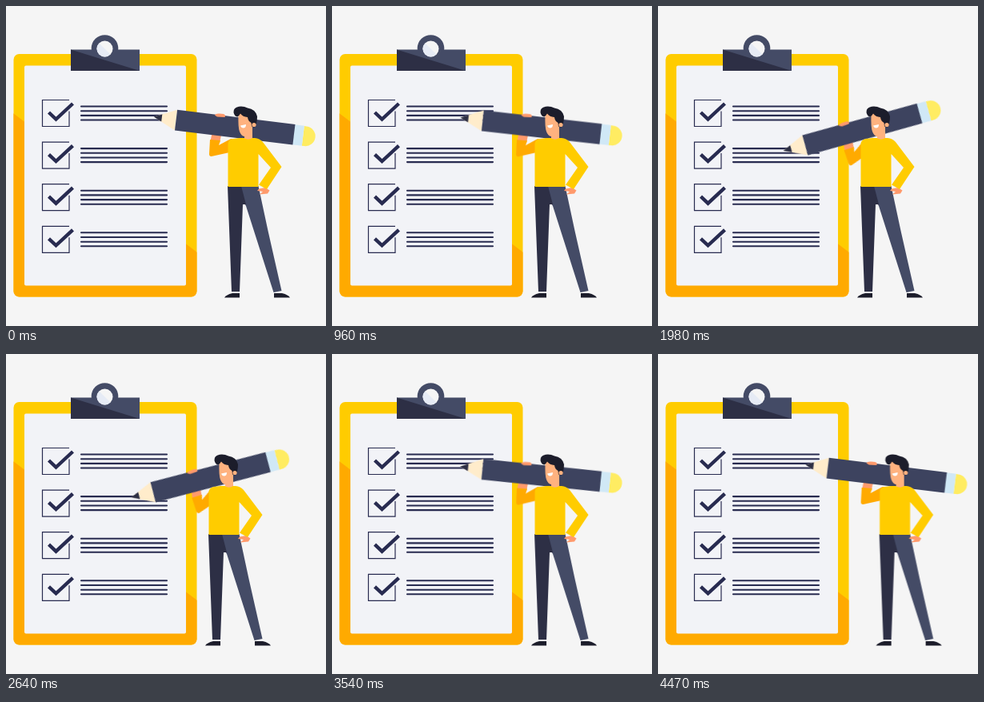
Animation, 400 px wide and 400 px high, one loop 4500 ms. Source, as an HTML page:

```html
<!DOCTYPE html>
<html lang="en">
<head>
<meta charset="utf-8">
<title>Checklist</title>
<style>
  html, body { margin: 0; width: 100%; height: 100%; overflow: hidden; background: #f5f5f5; }
  svg { display: block; width: 100%; height: 100%; }
  #arm { transform-origin: 289px 170px; }
  .navy { fill: #2d2f45; }
  .slate { fill: #444b66; }
  .skin { fill: #ff9a6c; }
  .face { fill: #ffb27f; }
  .shirt { fill: #ffcc00; }
  .shade { fill: #ffaa00; }
  .ink { fill: #1c1d2b; }
</style>
</head>
<body>
<svg viewBox="0 0 400 400">
  <defs>
    <clipPath id="board"><rect x="9.5" y="60" width="229" height="303.5" rx="7"/></clipPath>
    <g id="item" fill="none" stroke="#282b50">
      <path d="M79 131.500V150.500H45.500V117.500H79" stroke-width="1.200"/>
      <path d="M53.500 133L62.500 141.500L83.500 122" stroke-width="4.400"/>
      <path d="M94 125.500H201M94 131.200H201M94 136.900H201M94 142.500H201" stroke-width="2.100" stroke-linecap="round"/>
    </g>
  </defs>

  <g clip-path="url(#board)">
    <rect class="shirt" x="9" y="60" width="230" height="304"/>
    <path class="shade" d="M9 134L239 308V364H9Z"/>
  </g>
  <rect x="23" y="74.5" width="202" height="275" rx="2" fill="#f2f3f7"/>
  <circle class="slate" cx="123.5" cy="53" r="16.8"/>
  <rect class="slate" x="81" y="54.5" width="86" height="26.5"/>
  <path class="navy" d="M81 54.5L167 81H81Z"/>
  <circle cx="123.5" cy="53.5" r="10" fill="#f5f5f5"/>
  <path d="M116.4 46.4A10 10 0 0 0 130.6 60.6Z" fill="#e6ebf5"/>
  <g id="list"></g>

  <g id="man">
    <g id="arm">
      <path class="skin" d="M262 138H274L267 171H255Z"/>
      <path class="shade" d="M255 167L254 185Q254 189 259 187.500L284 182L292 168L281 166L266 174L268 168Z"/>
      <g transform="translate(212.500 143) rotate(7)">
        <path d="M-28 -1L0 -13.300V12.500Z" fill="#ffeccb"/>
        <path class="navy" d="M-28 -1L-18 -5.400V3.800Z"/>
        <path d="M160 -12.500H163A12.400 12.400 0 0 1 163 12.300H160Z" fill="#ffec62"/>
        <rect x="148" y="-12.800" width="12" height="25.200" fill="#d0e8f6"/>
        <rect y="-13.300" width="148.500" height="25.800" fill="#3d435f"/>
      </g>
      <path class="skin" d="M261 136.500Q262 134 267 134.500L272 135Q275 136 273.500 139L264 138.500Z"/>
    </g>

    <path class="ink" d="M273 364.500Q275 361 283 359H292V364.500ZM335 364.500V359H345Q353 361 355 364.500Z"/>
    <path class="slate" d="M294 225H315.500L327.500 281L344.500 356L334.500 358L300 250L294 240Z"/>
    <path class="navy" d="M277 225H294L300 248H296L292 357H282Z"/>
    <path class="skin" d="M316 228.500L324 227L329.500 230.500L327 234.500L317 235.500L321 232L314 231Z"/>
    <path class="shirt" d="M277.500 226V172Q278 167 284 166L292 165H311Q317 165.500 321 170L344.500 201L326 229L316 223.500L331 202L315.500 185V226Z"/>

    <path class="face" d="M290.500 136Q290 152 292 157Q294 162.500 298 163V165.500Q303 168 308 165V150L306 133H292Z"/>
    <path class="ink" d="M284.500 133Q284 127 291 125.800Q297 125 302 127.500Q312 129 314 138Q314 147 310.500 151.500L307 150.500L306.500 146Q302.500 144 302 139Q296 138.500 293 134.500Q291.500 137 289.500 138.500Q285.500 138 284.500 133Z"/>
    <circle class="face" cx="310" cy="148.500" r="2.600"/>
    <path d="M293 149.500L300 148Q300 152.500 296.500 152.500Q294 152.500 293 149.500Z" fill="#fff"/>
  </g>
</svg>
<script>
  const LOOP = 4500;
  const SINE = 'cubic-bezier(.37,0,.63,1)';
  const GLIDE = 'cubic-bezier(.3,.15,.7,.85)';

  document.getElementById('list').innerHTML = [0, 1, 2, 3]
    .map(i => `<use href="#item" y="${i * 52.6}"/>`).join('');

  // steps: [time in ms, transform value]
  function play(id, fn, unit, easing, steps) {
    const frames = steps.map(([t, v]) => ({
      offset: t / LOOP, transform: `${fn}(${v}${unit})`, easing
    }));
    return document.getElementById(id).animate(frames, { duration: LOOP, iterations: Infinity });
  }

  const runs = [
    play('man', 'translateX', 'px', GLIDE, [[0, 0], [960, -24], [3540, -24], [4500, 0]]),
    play('arm', 'rotate', 'deg', SINE, [[0, 0], [840, 0], [2060, -22.8], [2460, -22.8], [3720, 0], [4500, 0]])
  ];
  const start = performance.now();
  runs.forEach(run => { run.startTime = start; });
</script>
</body>
</html>
```
